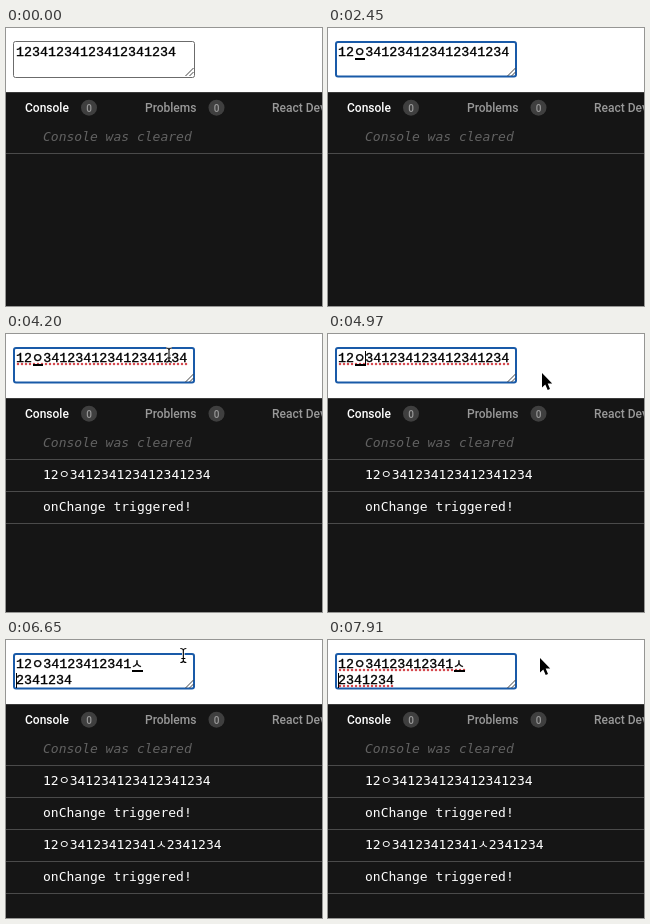
These frames come from a looping animation (316x278 px, 8 s). An HTML page with a canvas:

```html
<!DOCTYPE html>
<html lang="en">
<head>
<meta charset="utf-8">
<title>Textarea composition and console</title>
<style>
html, body { margin: 0; width: 100%; height: 100%; overflow: hidden; background: #151515; }
canvas { display: block; width: 316px; height: 278px; }
</style>
</head>
<body>
<canvas id="stage" width="316" height="278"></canvas>
<script>
const ctx = document.getElementById('stage').getContext('2d');
const LOOP = 8000, STEP = 70;
const MONO = '"DejaVu Sans Mono", monospace';
const FIELD_MONO = '"Liberation Mono", monospace';
const HANGUL = '"Noto Sans CJK KR", "Noto Sans CJK", sans-serif';
const UI = 'Roboto, sans-serif';
const FIELD = { x: 10, size: 13.333, wide: 11.3, family: FIELD_MONO, stroke: 0.35 };
const LOG = { x: 37, size: 13, wide: 11, family: MONO, stroke: 0 };

// Pointer path: time, x, y
const path = [
  [140, 141, 224], [350, 14, 27], [490, 14, 27], [630, 29, 27], [770, 1, 3],
  [910, 1, 3], [1260, 25, 26], [1540, 25, 26], [2030, 51, 15], [3150, 51, 16],
  [3220, 52, 17], [3710, 52, 17], [4200, 163, 21], [4550, 228, 37],
  [4830, 239, 42], [5390, 139, 30], [5670, 126.5, 26], [6300, 126.5, 26],
  [6930, 218, 7], [7070, 219, 9.5], [7210, 219, 9.5], [7910, 212, 18]
];

const within = (t, a, b) => t >= a && t < b;
const blink = (t, start) => Math.floor((t - start) / 490) % 2 === 0;

function pointerAt(t) {
  const next = path.findIndex(key => key[0] > t);
  if (next < 0) return path[path.length - 1].slice(1);
  const [t0, x0, y0] = path[Math.max(0, next - 1)];
  const [t1, x1, y1] = path[next];
  const k = t1 > t0 ? (t - t0) / (t1 - t0) : 0;
  return [x0 + (x1 - x0) * k, y0 + (y1 - y0) * k];
}

function rect(color, x, y, w, h) {
  ctx.fillStyle = color;
  ctx.fillRect(x, y, w, h);
}

function circle(x, y, r) {
  ctx.beginPath();
  ctx.arc(x, y, r, 0, Math.PI * 2);
}

function label(text, x, y, font, color, align = 'left', stroke = 0) {
  ctx.font = font;
  ctx.fillStyle = color;
  ctx.textAlign = align;
  ctx.fillText(text, x, y);
  if (stroke) {
    ctx.strokeStyle = color;
    ctx.lineWidth = stroke;
    ctx.strokeText(text, x, y);
  }
}

// Latin runs in monospace, Korean letters centred in a wider cell
function mixedText(text, style, y, color) {
  const { size, wide, family, stroke } = style;
  let x = style.x;
  for (const part of text.split(/([ㅇㅅ])/)) {
    if (/[ㅇㅅ]/.test(part)) {
      label(part, x + wide / 2, y, `${size - 0.5}px ${HANGUL}`, color, 'center', stroke);
      x += wide;
    } else {
      label(part, x, y, `${size}px ${family}`, color, 'left', stroke);
      x += ctx.measureText(part).width;
    }
  }
}

function squiggle(x0, x1, y) {
  ctx.fillStyle = '#d5494f';
  for (let x = x0; x < x1; x += 4) {
    circle(x + 1, y, 1.25);
    ctx.fill();
  }
}

function drawField(t) {
  const focused = t >= 1260;
  ctx.strokeStyle = focused ? '#195aa8' : '#6b6b6b';
  ctx.lineWidth = focused ? 2 : 1;
  ctx.beginPath();
  if (focused) ctx.roundRect(8, 14, 180, 34.5, 2);
  else ctx.roundRect(7.5, 13.5, 181, 36, 2);
  ctx.stroke();

  ctx.strokeStyle = '#444';
  ctx.lineWidth = 1;
  ctx.beginPath();
  for (const d of [8, 4]) {
    ctx.moveTo(187.5 - d, 48);
    ctx.lineTo(187.5, 48 - d);
  }
  ctx.stroke();

  const wrapped = t >= 6160;
  const text = wrapped ? '12ㅇ34123412341ㅅ'
    : t >= 2450 ? '12ㅇ341234123412341234' : '12341234123412341234';
  if (within(t, 3780, 6160)) squiggle(11, 181, 30);
  if (t >= 7560) {
    squiggle(11, 137, 30);
    squiggle(11, 67, 46);
  }
  mixedText(text, FIELD, 28, '#000');
  if (wrapped) {
    mixedText('2341234', FIELD, 44, '#000');
    rect('#000', 126, 30, 11, 2);
  }
  if (within(t, 2450, 5810)) rect('#000', 27, 30, 10, 2);
}

function drawCaret(t) {
  const show = (x, y) => rect('#000', x, y, 1, 15);
  if (within(t, 1470, 2450) && blink(t, 1470)) show(26, 17);
  if (within(t, 2450, 5810) && blink(t, 2590)) show(37, 17);
  if (within(t, 5880, 6160)) show(125, 17);
  if (t >= 6160 && !within(t, 7420, 7910)) show(10, 33);
}

function drawConsole(t) {
  rect('#3a3a3a', 0, 64, 316, 1);
  rect('#151515', 0, 65, 316, 213);
  const tab = `500 12px ${UI}`;
  label('Console', 19, 84, tab, '#fff');
  label('Problems', 139, 84, tab, '#999');
  label('React DevTools', 266, 84, tab, '#999');
  for (const x of [83, 210.5]) {
    ctx.fillStyle = '#3f3f3f';
    circle(x, 79.7, 8);
    ctx.fill();
    label('0', x, 83.5, `500 10px ${UI}`, '#999', 'center');
  }
  label('Console was cleared', 37, 113, `italic 13px ${MONO}`, '#626262');
  rect('#4a4a4a', 0, 125, 316, 1);

  const rows = [];
  if (t >= 2520) rows.push('12ㅇ341234123412341234', 'onChange triggered!');
  if (t >= 6230) rows.push('12ㅇ34123412341ㅅ2341234', 'onChange triggered!');
  rows.forEach((text, i) => {
    mixedText(text, LOG, 145 + i * 32, '#fff');
    rect('#4a4a4a', 0, 157 + i * 32, 316, 1);
  });
}

function drawBeam(x, y) {
  ctx.beginPath();
  ctx.moveTo(x - 3, y - 7);
  ctx.quadraticCurveTo(x, y - 7, x, y - 5);
  ctx.lineTo(x, y + 5);
  ctx.quadraticCurveTo(x, y + 7, x - 3, y + 7);
  ctx.moveTo(x + 3, y - 7);
  ctx.quadraticCurveTo(x, y - 7, x, y - 5);
  ctx.moveTo(x, y + 5);
  ctx.quadraticCurveTo(x, y + 7, x + 3, y + 7);
  ctx.moveTo(x - 2, y + 3);
  ctx.lineTo(x + 2, y + 3);
  for (const [color, width] of [['#fff', 2.6], ['#000', 1.1]]) {
    ctx.strokeStyle = color;
    ctx.lineWidth = width;
    ctx.stroke();
  }
}

function drawArrow(x, y) {
  const outline = [[0, 0], [0, 14.5], [3.3, 11.4], [5.7, 17], [8, 16], [5.7, 10.6], [10.2, 10.4]];
  ctx.beginPath();
  outline.forEach(([dx, dy]) => ctx.lineTo(x + dx, y + dy));
  ctx.closePath();
  ctx.lineJoin = 'round';
  ctx.strokeStyle = '#fff';
  ctx.lineWidth = 2;
  ctx.stroke();
  ctx.fillStyle = '#000';
  ctx.fill();
}

function drawPointer(t) {
  if (t < 140 || within(t, 2450, 3150) || within(t, 6160, 6300)) return;
  const [x, y] = pointerAt(t);
  const overField = x > 7 && x < 189 && y > 13 && y < 50;
  (overField ? drawBeam : drawArrow)(x, y);
  if (within(t, 1400, 1470) || within(t, 5810, 5880)) {
    ctx.strokeStyle = '#000';
    ctx.lineWidth = 1.5;
    circle(x, y, 16.7);
    ctx.stroke();
  }
}

function frame() {
  const t = Math.floor(performance.now() % LOOP / STEP) * STEP;
  rect('#fff', 0, 0, 316, 64);
  drawConsole(t);
  drawField(t);
  drawCaret(t);
  drawPointer(t);
  requestAnimationFrame(frame);
}
frame();
</script>
</body>
</html>
```
